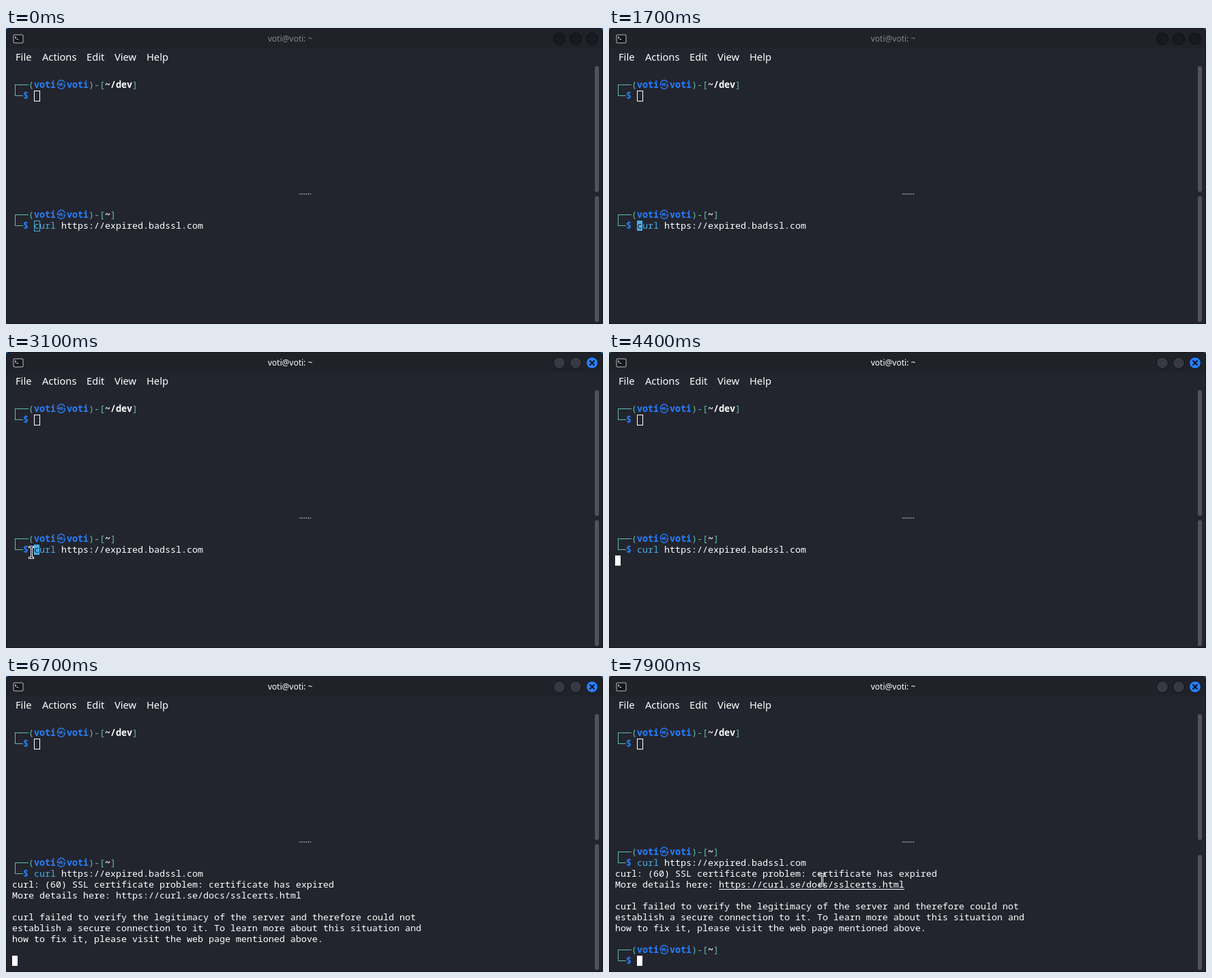
Animation of 875 by 435 pixels, one loop 8000 ms. Source, as an HTML page with a canvas:

```html
<!DOCTYPE html>
<html lang="en">
<head>
<meta charset="utf-8">
<title>Terminal</title>
<style>
  html, body { margin: 0; width: 100%; height: 100%; overflow: hidden; background: #23252e; }
  canvas { display: block; }
</style>
</head>
<body>
<canvas id="stage" width="875" height="435"></canvas>
<script>
const ctx = document.getElementById('stage').getContext('2d');
const LOOP = 8000, STEP = 100;
const LEFT = 9, CELL = 8, LINE = 16;
const MONO = '13.333px "Noto Sans Mono", "DejaVu Sans Mono", monospace';
const SANS = '"Noto Sans", "Open Sans", sans-serif';
const USER = 'voti';
const C = {
  back: '#23252e', title: '#20222a', white: '#ffffff', teal: '#5ebdab',
  blue: '#277fff', cyan: '#49aee6', bar: '#515359', desk: '#1a6fc0', edge: '#14161b'
};
const URL_TEXT = 'https://expired.badssl.com';
const HELP_URL = 'https://curl.se/docs/sslcerts.html';
const OUTPUT = [
  'curl: (60) SSL certificate problem: certificate has expired',
  'More details here: ' + HELP_URL,
  '',
  'curl failed to verify the legitimacy of the server and therefore could not',
  'establish a secure connection to it. To learn more about this situation and',
  'how to fix it, please visit the web page mentioned above.'
];

// Pointer visits: each key is [time, x, y]; hidden at "until".
const VISITS = [
  { until: 1300, keys: [[500, 150, 130], [800, 104, 198], [1100, 82, 228]] },
  { until: 4400, keys: [[2400, 82, 228], [2800, 97, 286], [3100, 37, 294]] },
  { until: 5700, keys: [[5600, 32, 424]] },
  { until: LOOP, keys: [[7300, 345, 365], [7600, 322, 318], [7900, 312, 299]] }
];

const colX = col => LEFT + col * CELL;

function rect(x, y, w, h, color) {
  ctx.fillStyle = color;
  ctx.fillRect(x, y, w, h);
}

function pill(x, y, w, h, r, color) {
  ctx.fillStyle = color;
  ctx.beginPath();
  ctx.roundRect(x, y, w, h, r);
  ctx.fill();
}

function label(text, x, y, font, color, align = 'left') {
  ctx.font = font;
  ctx.textAlign = align;
  ctx.fillStyle = color;
  ctx.fillText(text, x, y);
}

function mono(text, col, top, color = C.white, bold = false) {
  label(text, colX(col), top + 12, (bold ? 'bold ' : '') + MONO, color);
}

function prompt(top, path) {
  rect(13, top + 7, 20, 1, C.teal);
  rect(13, top + 7, 1, LINE + 1, C.teal);
  rect(13, top + 7 + LINE, 12, 1, C.teal);
  mono('(', 3, top, C.teal);
  mono(USER, 4, top, C.blue, true);
  label('㉿', 81, top + 12, 'bold 13.333px "Noto Sans CJK KR", "Noto Sans CJK JP", "Noto Sans CJK", sans-serif', C.blue, 'center');
  mono(USER, 10, top, C.blue, true);
  mono(')-[', 14, top, C.teal);
  mono(path, 17, top, C.white, true);
  mono(']', 17 + path.length, top, C.teal);
  mono('$', 2, top + LINE, C.blue, true);
}

function command(top) {
  mono('curl', 4, top, C.cyan);
  mono(URL_TEXT, 9, top);
}

function blockCursor(col, top, color = C.white) {
  rect(colX(col), top, CELL, 15, color);
}

function hollowCursor(col, top, color = C.white) {
  ctx.strokeStyle = color;
  ctx.lineWidth = 1;
  ctx.strokeRect(colX(col) + 0.5, top + 0.5, CELL, 15);
}

function disc(x, fill) {
  ctx.beginPath();
  ctx.arc(x, 16, 8.5, 0, Math.PI * 2);
  ctx.fillStyle = fill;
  ctx.fill();
  ctx.strokeStyle = '#0e1015';
  ctx.lineWidth = 1;
  ctx.stroke();
}

function chrome(active) {
  rect(0, 0, 875, 435, C.desk);
  pill(0, 0, 875, 435, [5, 5, 0, 0], C.edge);
  pill(1, 1, 873, 433, [4, 4, 0, 0], C.title);
  rect(1, 30, 873, 404, C.back);

  pill(10.5, 9.5, 15, 13, 2, '#b9bbc0');
  pill(11.5, 10.5, 13, 11, 1, '#15171c');
  ctx.strokeStyle = C.white;
  ctx.lineWidth = 1;
  ctx.beginPath();
  ctx.moveTo(13, 12.5); ctx.lineTo(15, 14); ctx.lineTo(13, 15.5);
  ctx.moveTo(15.5, 16.5); ctx.lineTo(18, 16.5);
  ctx.stroke();

  label(`${USER}@${USER}: ~`, 416.5, 20, '500 12px ' + SANS, active ? C.white : '#85878c', 'center');
  disc(811, active ? '#363943' : '#181a21');
  disc(835, active ? '#363943' : '#181a21');
  disc(859, active ? C.blue : '#181a21');
  if (active) {
    ctx.strokeStyle = '#10131a';
    ctx.lineWidth = 2;
    ctx.beginPath();
    ctx.moveTo(855.5, 12.5); ctx.lineTo(862.5, 19.5);
    ctx.moveTo(862.5, 12.5); ctx.lineTo(855.5, 19.5);
    ctx.stroke();
  }

  [['File', 14], ['Actions', 53], ['Edit', 118], ['View', 159], ['Help', 206]]
    .forEach(([text, x]) => label(text, x, 48, '14.667px ' + SANS, C.white));

  for (let i = 0; i < 6; i++) rect(430 + i * 3, 243, 2, 2, '#74767b');
}

function pointerAt(t) {
  const visit = VISITS.find(v => t >= v.keys[0][0] && t < v.until);
  if (!visit) return null;
  const { keys } = visit;
  const next = keys.findIndex(k => k[0] > t);
  if (next < 0) return keys[keys.length - 1].slice(1);
  const [t0, x0, y0] = keys[next - 1], [t1, x1, y1] = keys[next];
  const k = (t - t0) / (t1 - t0);
  return [Math.round(x0 + (x1 - x0) * k), Math.round(y0 + (y1 - y0) * k)];
}

function drawPointer([x, y]) {
  const beam = (grow, color) => {
    rect(x - 3 - grow, y - 8 - grow, 6 + 2 * grow, 1 + 2 * grow, color);
    rect(x - 3 - grow, y + 8 - grow, 6 + 2 * grow, 1 + 2 * grow, color);
    rect(x - grow, y - 8, 1 + 2 * grow, 17, color);
  };
  beam(1, C.white);
  beam(0, '#000000');
}

function underlineIfHovered(pointer, col, text, top) {
  if (!pointer) return;
  const x = colX(col), w = text.length * CELL, [px, py] = pointer;
  if (px >= x && px < x + w && py >= top && py < top + LINE) rect(x, top + 14, w, 1, C.white);
}

function draw(t) {
  const active = (t >= 1000 && t < 1700) || t >= 3000;
  const focused = active || (t >= 1700 && t < 1900);
  const sent = t >= 4400, failed = t >= 6700, done = t >= 6800;
  const top = done ? 251 : 267;
  const pointer = pointerAt(t);

  chrome(active);
  pill(863, 56, 6, 185, 3, C.bar);
  pill(863, done ? 263 : 247, 6, done ? 169 : 185, 3, C.bar);

  prompt(76, '~/dev');
  hollowCursor(4, 92);

  const commandTop = top + LINE;
  prompt(top, '~');
  if (!sent && focused) blockCursor(4, commandTop, C.cyan);
  command(commandTop);
  if (!sent && focused) mono('c', 4, commandTop, C.back);
  if (!sent && !focused) hollowCursor(4, commandTop, C.cyan);
  underlineIfHovered(pointer, 9, URL_TEXT, commandTop);

  if (failed) {
    OUTPUT.forEach((text, i) => mono(text, 0, commandTop + (i + 1) * LINE));
    underlineIfHovered(pointer, 19, HELP_URL, commandTop + 2 * LINE);
  }
  if (done) {
    prompt(395, '~');
    blockCursor(4, 411);
  } else if (sent) {
    blockCursor(0, failed ? 411 : 299);
  }
  if (pointer) drawPointer(pointer);
}

const start = performance.now();
function tick() {
  const t = (performance.now() - start) % LOOP;
  draw(Math.floor(t / STEP) * STEP);
  requestAnimationFrame(tick);
}
tick();
</script>
</body>
</html>
```
